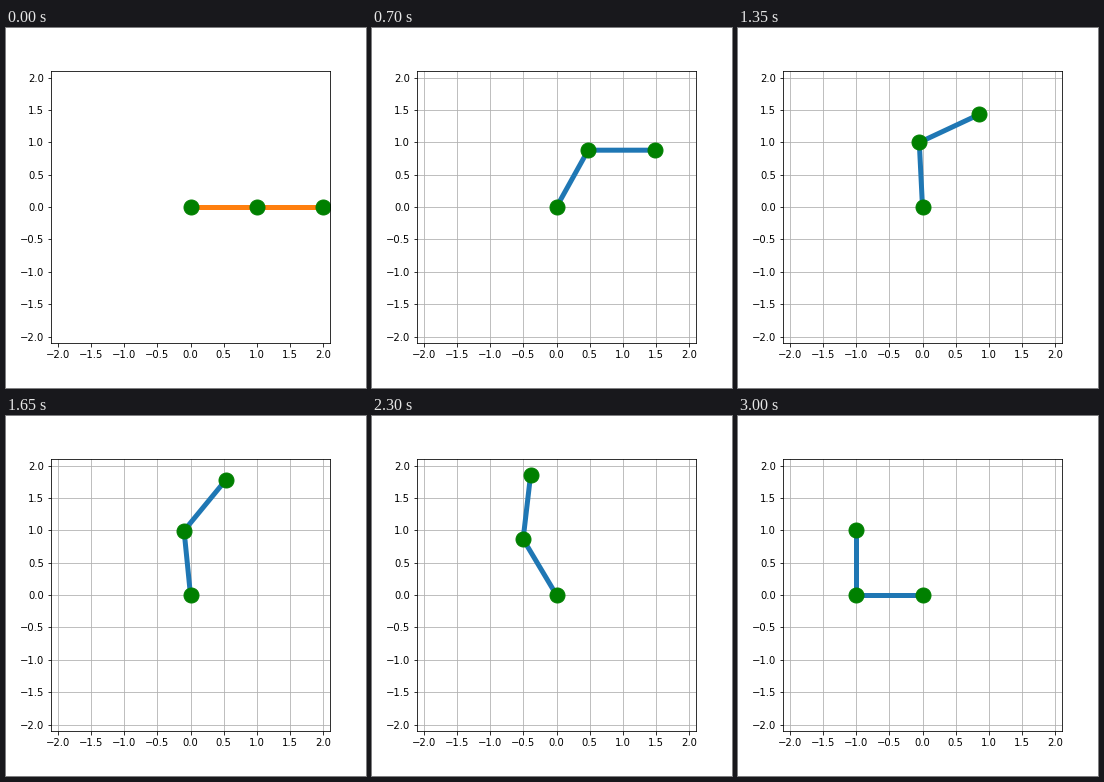
These frames come from a looping animation (360 px wide and 360 px high, 3.05 s). A matplotlib script:

```python
import numpy as np
import matplotlib.pyplot as plt
from matplotlib.animation import FuncAnimation

STEPS = 20
LIMIT = 2.1

# Absolute link angles (degrees) at the waypoints
WAYPOINTS = np.array([[0, 0], [90, 0], [98.8, 81.2], [180, 90]])


def pose(step):
    """Joint coordinates of the arm; each leg eases linearly in joint space."""
    leg, i = divmod(step, STEPS)
    t = i / (STEPS - 1)
    angles = np.radians(WAYPOINTS[leg] * (1 - t) + WAYPOINTS[leg + 1] * t)
    xs = np.concatenate([[0], np.cumsum(np.cos(angles))])
    ys = np.concatenate([[0], np.cumsum(np.sin(angles))])
    return xs, ys


plt.rcParams.update({"font.family": "DejaVu Sans", "font.size": 10})
fig = plt.figure(figsize=(5, 5), dpi=72, facecolor="white")
fig.subplots_adjust(left=0.125, right=0.9, bottom=0.125, top=0.88)
ax = fig.add_subplot()
ax.set(xlim=(-LIMIT, LIMIT), ylim=(-LIMIT, LIMIT))
ticks = np.arange(-2, 2.1, 0.5)
ax.set_xticks(ticks)
ax.set_yticks(ticks)

links, = ax.plot([], [], lw=5)
joints, = ax.plot([], [], "o", color="green", ms=15)


def draw(n):
    started = n > 0
    ax.grid(started)
    links.set_color("C0" if started else "C1")
    xs, ys = pose(max(n - 1, 0))
    links.set_data(xs, ys)
    joints.set_data(xs, ys)
    return links, joints


anim = FuncAnimation(fig, draw, frames=3 * STEPS + 1, interval=50,
                     init_func=lambda: draw(0), repeat=True, repeat_delay=0,
                     blit=False)
plt.show()
```
